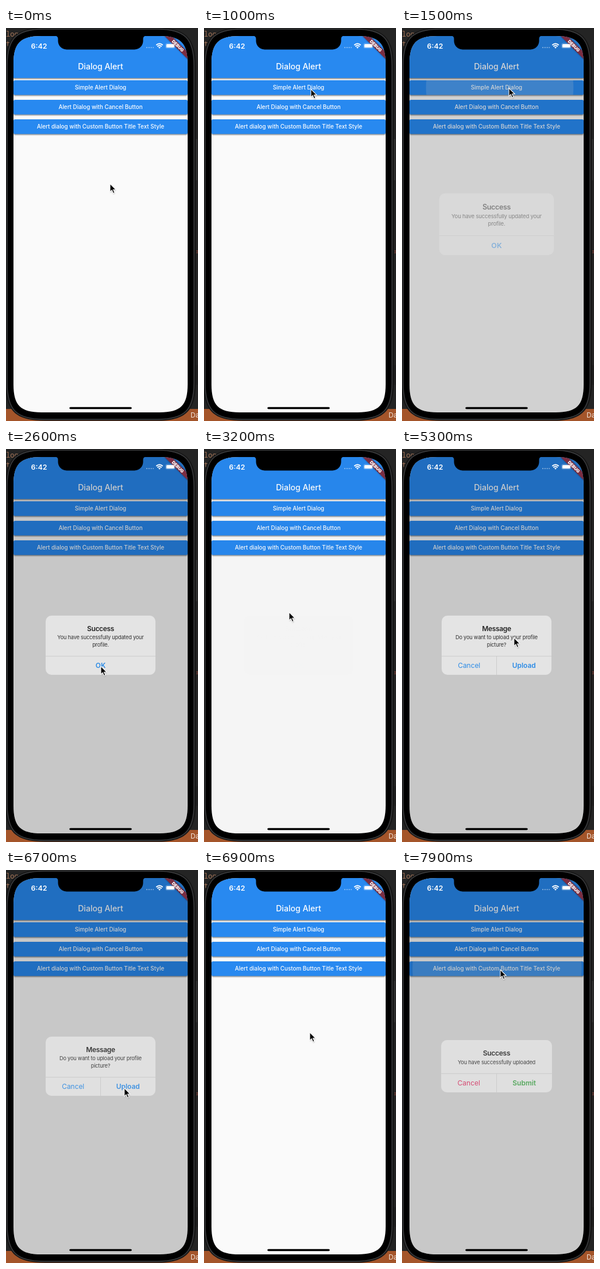
An HTML page that plays this animation: 334x684 px, repeating every 8 s.

```html
<!DOCTYPE html>
<html lang="en">
<head>
<meta charset="utf-8">
<title>Dialog Alert</title>
<style>
  html, body { margin: 0; width: 100%; height: 100%; overflow: hidden; background: #232323; }
  svg { display: block; width: 334px; height: 684px; font-family: Inter, Roboto, sans-serif; }
  .mid { text-anchor: middle; }
  .label { font-size: 9.85px; font-weight: 500; fill: #fff; }
  .heading { font-size: 12px; font-weight: 600; letter-spacing: -.34px; fill: #252525; }
  .body { font-size: 9.2px; letter-spacing: -.2px; fill: #303030; }
  .action { font-size: 11.9px; }
  .code { font: 12px "Noto Sans Mono", monospace; }
</style>
</head>
<body>
<svg viewBox="0 0 334 684" xmlns="http://www.w3.org/2000/svg">
  <defs>
    <clipPath id="screen"><path id="screenShape"/></clipPath>
    <filter id="soft" x="-10%" y="-30%" width="120%" height="170%"><feGaussianBlur stdDeviation=".9"/></filter>
  </defs>

  <!-- desktop behind the phone -->
  <rect width="334" height="684" fill="#242424"/>
  <rect x="329" y="587" width="5" height="34" fill="#1f1f1f"/>
  <g class="code" fill="#a9795c">
    <text x="0" y="15">log</text><text x="0" y="32">t</text>
    <text x="330" y="392" font-size="9" fill="#8a4238">r</text>
  </g>
  <rect y="663" width="334" height="21" fill="#a4552a"/>
  <text x="321" y="678" font-size="12" fill="#f1e4dc">Da</text>

  <!-- phone body with its side button -->
  <rect x="329" y="193" width="3.6" height="72" rx="1" fill="#333"/>
  <path id="shell" fill="#171717"/>
  <path id="bezel" stroke="#3d3e40" stroke-width="1.5"/>

  <g clip-path="url(#screen)">
    <rect x="13" y="14" width="303" height="655" fill="#fafafa"/>
    <rect x="13" y="16" width="303" height="72.5" opacity=".5" filter="url(#soft)"/>
    <rect x="13" y="14" width="303" height="73" fill="#2889f0"/>
    <text class="mid" x="164.5" y="72" font-size="14.1" font-weight="500" fill="#fff">Dialog Alert</text>
    <g id="buttons"></g>
    <rect id="barrier" x="13" y="14" width="303" height="655"/>
    <g id="dialogs"></g>
    <g transform="translate(316 14) rotate(45)">
      <rect x="-45" y="19.8" width="90" height="8.5" opacity=".5" filter="url(#soft)"/>
      <rect x="-45" y="19.8" width="90" height="8.5" fill="#7b2e42"/>
      <text class="mid" x="0" y="26.7" font-size="7.5" font-weight="900" fill="#fff">DEBUG</text>
    </g>
  </g>

  <!-- status bar, notch and home indicator -->
  <text class="mid" x="57.5" y="35.5" font-size="12.4" font-weight="600" fill="#fff">6:42</text>
  <path d="M244 34H257" stroke="#fff" stroke-opacity=".4" stroke-width="2" stroke-dasharray="2 1.8"/>
  <g fill="none" stroke="#fff" stroke-width="1.9">
    <path d="M261.3 29.8Q267 24.6 272.7 29.8M263.3 32.2Q267 28.9 270.7 32.2"/>
    <path d="M265 33.6Q267 32 269 33.6L267 35.8Z" fill="#fff" stroke="none"/>
  </g>
  <rect x="277.8" y="26.9" width="16" height="8.2" rx="2.4" fill="none" stroke="#fff" stroke-opacity=".45" stroke-width=".8"/>
  <rect x="278.9" y="28" width="13.8" height="6" rx="1.5" fill="#fff"/>
  <path d="M294.8 29.6q1.5 1.4 0 2.8z" fill="#fff" opacity=".5"/>
  <path d="M85.5 13.5Q90.5 14 90.5 19V22.5A15 15 0 0 0 105.5 37.5H223.5A15 15 0 0 0 238.5 22.5V19Q238.5 14 243.5 13.5Z"/>
  <rect x="110.3" y="659.8" width="108.4" height="3.5" rx="1.75"/>

  <g id="cursor">
    <path d="M0 0V14.2L3.2 11.2L5.6 16.8L8 15.8L5.7 10.3H10.2Z" transform="translate(.4 1.2)" opacity=".35" filter="url(#soft)"/>
    <path d="M0 0V14.2L3.2 11.2L5.6 16.8L8 15.8L5.7 10.3H10.2Z" stroke="#fff" stroke-width="1.1"/>
  </g>
</svg>

<script>
const LOOP = 8000, CX = 164.5, CY = 341.5, BLUE = '#2b8be6', NEVER = 1e6;
const FADE = 250;

const buttons = ['Simple Alert Dialog', 'Alert Dialog with Cancel Button',
  'Alert dialog with Custom Button Title Text Style'];

const dialogs = [
  { open: 1385, close: 2960, tapX: 186, title: 'Success',
    lines: ['You have successfully updated your', 'profile.'],
    actions: [['OK', BLUE, 600]] },
  { open: 4182, close: 6645, tapX: 154, title: 'Message',
    lines: ['Do you want to upload your profile', 'picture?'],
    actions: [['Cancel', BLUE, 400], ['Upload', BLUE, 600]] },
  { open: 7715, close: NEVER, tapX: 171, title: 'Success',
    lines: ['You have successfully uploaded'],
    actions: [['Cancel', '#d93464', 400], ['Submit', '#43a34c', 600]] }
];

// time, x, y of the pointer tip
const pointerPath = [
  [0, 181, 271], [250, 181, 271], [1050, 186, 104.5], [1700, 186, 104.5],
  [2500, 165, 378], [2960, 165, 378], [3200, 148, 284], [3900, 154, 139],
  [4600, 154, 139], [5600, 206, 380.5], [6690, 206, 380.5],
  [6900, 184, 282.5], [7450, 171, 173.5], [8000, 171, 173.5]
];

const $ = id => document.getElementById(id);
const clamp = v => Math.max(0, Math.min(1, v));
const smooth = v => v * v * (3 - 2 * v);
const easeOut = (v, power) => 1 - (1 - v) ** power;
const text = (cls, x, y, str, extra = '') =>
  `<text class="mid ${cls}" x="${x}" y="${y}" ${extra}>${str}</text>`;

// Rectangle with continuous-curvature corners
function squircle(x, y, w, h, radius) {
  const e = radius * 1.28, k = e * .75;
  const corner = (a, b, c, d) => `c${a * k} ${b * k} ${a * e + c * (e - k)} ${b * e + d * (e - k)} ${(a + c) * e} ${(b + d) * e}`;
  const bend = (a, b, c, d) => `c${a * k} ${b * k} ${a * e + c * (e - k)} ${b * e + d * (e - k)} ${a * e + c * e} ${b * e + d * e}`;
  return `M${x + e} ${y}h${w - 2 * e}${bend(1, 0, 0, 1)}v${h - 2 * e}${bend(0, 1, -1, 0)}` +
    `h${2 * e - w}${bend(-1, 0, 0, -1)}v${2 * e - h}${bend(0, -1, 1, 0)}z`;
}

function buttonMarkup(label, i) {
  const y = 91 + 34 * i;
  const box = `x="13" width="303" height="25.5" rx="2.8"`;
  return `<clipPath id="clip${i}"><rect ${box} y="${y}"/></clipPath>
    <rect ${box} y="${y + 1.4}" opacity=".45" filter="url(#soft)"/>
    <rect ${box} y="${y}" fill="#2889f0"/>
    <g clip-path="url(#clip${i})"><circle id="splash${i}" cy="${y + 12.7}" fill="#f6fff0"/></g>
    ${text('label', CX, y + 16.2, label)}`;
}

function dialogMarkup({ title, lines, actions }, i) {
  const height = 77 + 13 * lines.length, width = 191;
  const left = CX - width / 2, top = CY - height / 2, bottom = top + height;
  const rule = bottom - 32.3, cell = width / actions.length;
  const split = actions.length > 1 ? `M${CX} ${rule}V${bottom}` : '';
  return `<g id="dialog${i}">
    <rect x="${left}" y="${top}" width="${width}" height="${height}" rx="9.9" fill="#e4e4e4"/>
    <path d="M${left} ${rule}h${width}${split}" stroke="#c6c6c6" stroke-width=".8"/>
    ${text('heading', CX, top + 27, title)}
    ${lines.map((line, n) => text('body', CX, top + 41.3 + 12.8 * n, line)).join('')}
    ${actions.map(([name, color, weight], n) => text('action', left + cell * (n + .5),
      bottom - 11.7, name, `fill="${color}" font-weight="${weight}"`)).join('')}
  </g>`;
}

$('screenShape').setAttribute('d', squircle(13, 14, 303, 655, 38));
$('shell').setAttribute('d', squircle(-1.5, -.5, 332, 684, 54));
$('bezel').setAttribute('d', squircle(2, 2, 325, 679, 50));
$('buttons').innerHTML = buttons.map(buttonMarkup).join('');
$('dialogs').innerHTML = dialogs.map(dialogMarkup).join('');

function pointerAt(t) {
  const n = pointerPath.findIndex(p => p[0] > t);
  const [t0, x0, y0] = pointerPath[n - 1], [t1, x1, y1] = pointerPath[n];
  const k = smooth((t - t0) / (t1 - t0));
  return [x0 + (x1 - x0) * k, y0 + (y1 - y0) * k];
}

function drawSplash(i, age, tapX) {
  const radius = Math.min(155, 128 + .27 * (age - 115));
  const splash = $('splash' + i);
  splash.setAttribute('r', age > -180 ? radius : 0);
  splash.setAttribute('cx', tapX + (CX - tapX) * .9 * radius / 155);
  splash.setAttribute('opacity', .16 * clamp((500 - age) / 330));
}

function draw(t) {
  let shade = 0;
  dialogs.forEach(({ open, close, tapX }, i) => {
    const enter = clamp((t - open) / FADE);
    const shown = t < close ? enter : clamp(1 - (t - close) / FADE);
    const scale = 1 + .3 * (1 - enter) * Math.exp(-2.8 * enter);
    const node = $('dialog' + i);
    node.setAttribute('opacity', smooth(shown));
    node.setAttribute('transform',
      `translate(${CX} ${CY}) scale(${scale}) translate(${-CX} ${-CY})`);
    shade = Math.max(shade, .205 * easeOut(shown, 2.6));
    drawSplash(i, t - open, tapX);
  });
  $('barrier').setAttribute('opacity', shade);
  $('cursor').setAttribute('transform', `translate(${pointerAt(t)})`);
}

const start = performance.now();
function tick() {
  draw((performance.now() - start) % LOOP);
  requestAnimationFrame(tick);
}
tick();
</script>
</body>
</html>
```
